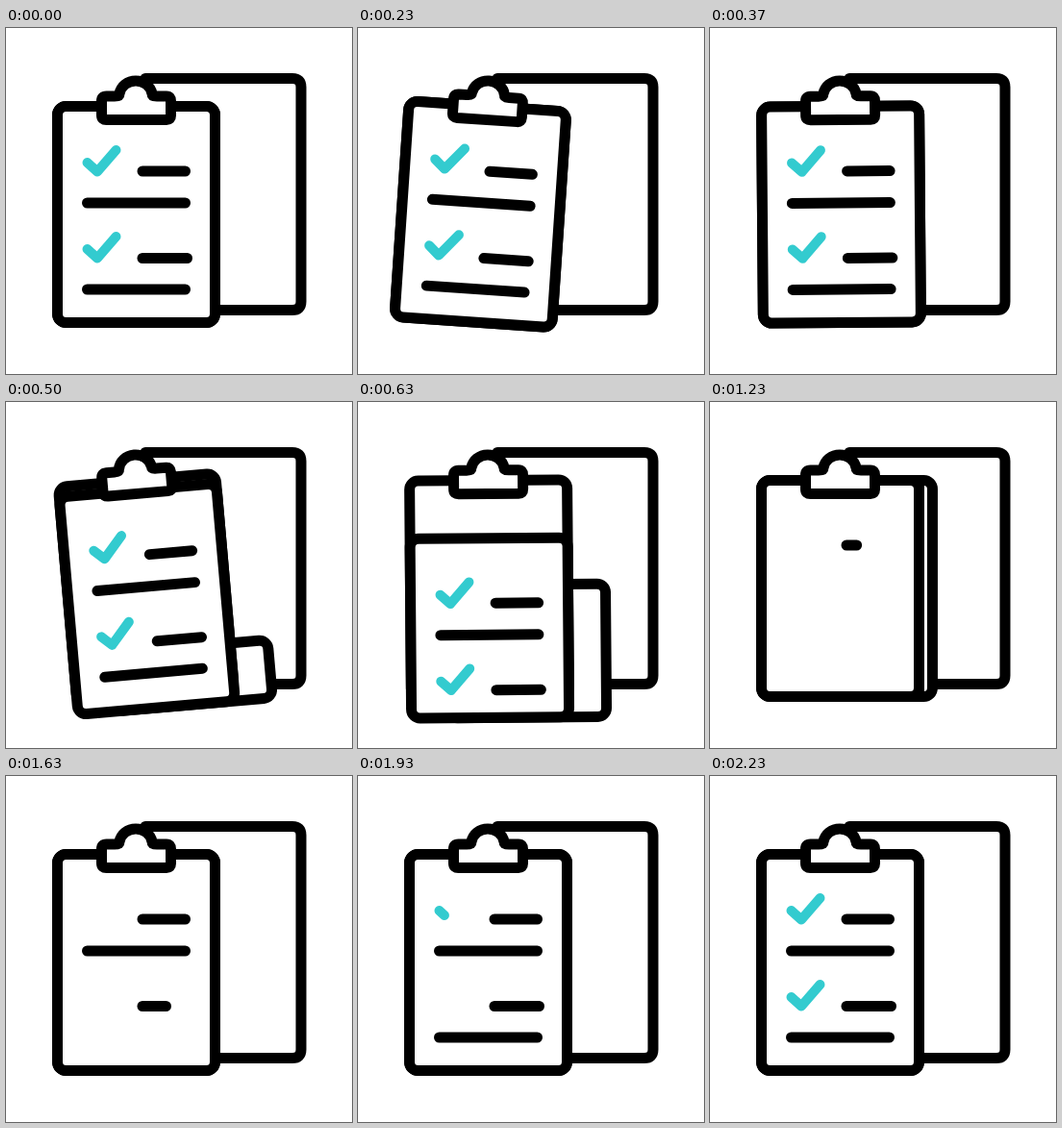
Animation, 360 px wide and 360 px high, one loop 2500 ms. Source, as an HTML page:

```html
<!DOCTYPE html>
<html lang="en">
<head>
<meta charset="utf-8">
<title>Clipboard checklist</title>
<style>
  html, body { margin: 0; width: 100%; height: 100%; overflow: hidden; background: #fff; }
  svg { display: block; width: 100%; height: 100%; }
  .ink { fill: #fff; stroke: #000; stroke-width: 11; stroke-linecap: round; stroke-linejoin: round; }
  .tick { fill: none; stroke: #33cbcf; stroke-width: 10; }
</style>
</head>
<body>
<svg viewBox="0 0 360 360">
  <defs>
    <clipPath id="window"><rect id="windowBox" x="53" y="76" width="165" height="236"/></clipPath>
  </defs>
  <path class="ink" d="M145 52.5H298Q307 52.5 307 61.5V284.500Q307 293.500 298 293.500H150"/>
  <g id="swing">
    <rect id="sheet" class="ink" x="53.500" y="81.500" width="164" height="225" rx="9"/>
    <rect class="ink" x="53.500" y="81.500" width="164" height="225" rx="9"/>
    <rect id="page" class="ink" x="53.500" y="81.500" width="164" height="225" rx="9"/>
    <g clip-path="url(#window)"><g id="content"></g></g>
    <path class="ink" d="M99.500 76Q99.500 71 104.500 71H113Q118 71 118 68.500A17.200 16 0 0 1 152 68.500Q152 71 157 71H167Q171.500 71 171.500 76V91Q171.500 95.500 167 95.500H104.500Q99.500 95.500 99.500 91Z"/>
  </g>
</svg>
<script>
const LOOP = 2500, TOP = 81.5, BOTTOM = 306.5, LEFT = 53.5;
const FLIP_START = 379, FLIP_END = 1070, TUCK_START = 1085, TUCK_END = 1330;
const $ = id => document.getElementById(id);
const span = (t, a, b) => Math.min(1, Math.max(0, (t - a) / (b - a)));
const smooth = p => p * p * (3 - 2 * p);
const easeInOut = (p, n) => p < 0.5 ? Math.pow(2 * p, n) / 2 : 1 - Math.pow(2 - 2 * p, n) / 2;

// [time, degrees] turning points of the swing
const swingKeys = [[20, 0], [240, 3.9], [505, -5], [720, 2.2], [830, 0]];

// path, start and end of drawing, class
const marks = [
  ["M142 149H186.5", 1200, 1330, ""],
  ["M84.5 182H186.5", 1330, 1560, ""],
  ["M142 239.5H188.5", 1560, 1695, ""],
  ["M84.5 272H186.5", 1695, 1900, ""],
  ["M84.5 140L95 149.500L114.5 127", 1880, 2185, "tick"],
  ["M84.5 230L95 239.500L114.5 217", 1950, 2225, "tick"]
].map(([d, from, to, cls]) => {
  const el = document.createElementNS("http://www.w3.org/2000/svg", "path");
  el.setAttribute("d", d);
  el.setAttribute("class", "ink " + cls);
  el.setAttribute("pathLength", 1);
  $("content").appendChild(el);
  return { el, from, to };
});

function angleAt(t) {
  for (let i = 1; i < swingKeys.length; i++) {
    const [t0, a0] = swingKeys[i - 1], [t1, a1] = swingKeys[i];
    if (t < t1) return a0 + (a1 - a0) * smooth(span(t, t0, t1));
  }
  return 0;
}

function show(el, on) {
  el.setAttribute("visibility", on ? "visible" : "hidden");
}

function place(el, top, bottom) {
  el.setAttribute("y", top);
  el.setAttribute("height", Math.max(0, bottom - top));
}

function draw(t) {
  $("swing").setAttribute("transform", `rotate(${angleAt(t)} 135 75)`);

  const flip = span(t, FLIP_START, FLIP_END);
  const bottom = BOTTOM + 24 * Math.sin(Math.PI * flip);
  const fresh = t >= FLIP_END;

  // the old page slides down and rolls under the lower edge
  const drop = fresh ? 0 : 257 * easeInOut(flip, 2.4);
  const pageTop = TOP + drop;
  place($("page"), pageTop, bottom);
  show($("page"), pageTop < bottom);
  $("content").setAttribute("transform", `translate(0 ${drop})`);
  $("windowBox").setAttribute("height", bottom - 76);

  // it comes up again behind the board, then tucks in
  const rise = span(t, FLIP_START, 1099);
  const sheetTop = TOP + 257 * (1 - rise) ** 2;
  const shift = 39 * smooth(span(t, FLIP_START, 470)) * (1 - smooth(span(t, TUCK_START, TUCK_END)));
  place($("sheet"), sheetTop, bottom);
  $("sheet").setAttribute("x", LEFT + shift);
  show($("sheet"), t > FLIP_START && t < TUCK_END && sheetTop < bottom);

  for (const { el, from, to } of marks) {
    const p = fresh ? span(t, from, to) : 1;
    el.setAttribute("stroke-dasharray", p < 1 ? `${p} 2` : "none");
    show(el, p > 0);
  }
}

const start = performance.now();
function tick(now) {
  draw(Math.max(0, now - start) % LOOP);
  requestAnimationFrame(tick);
}
draw(0);
requestAnimationFrame(tick);
</script>
</body>
</html>
```
